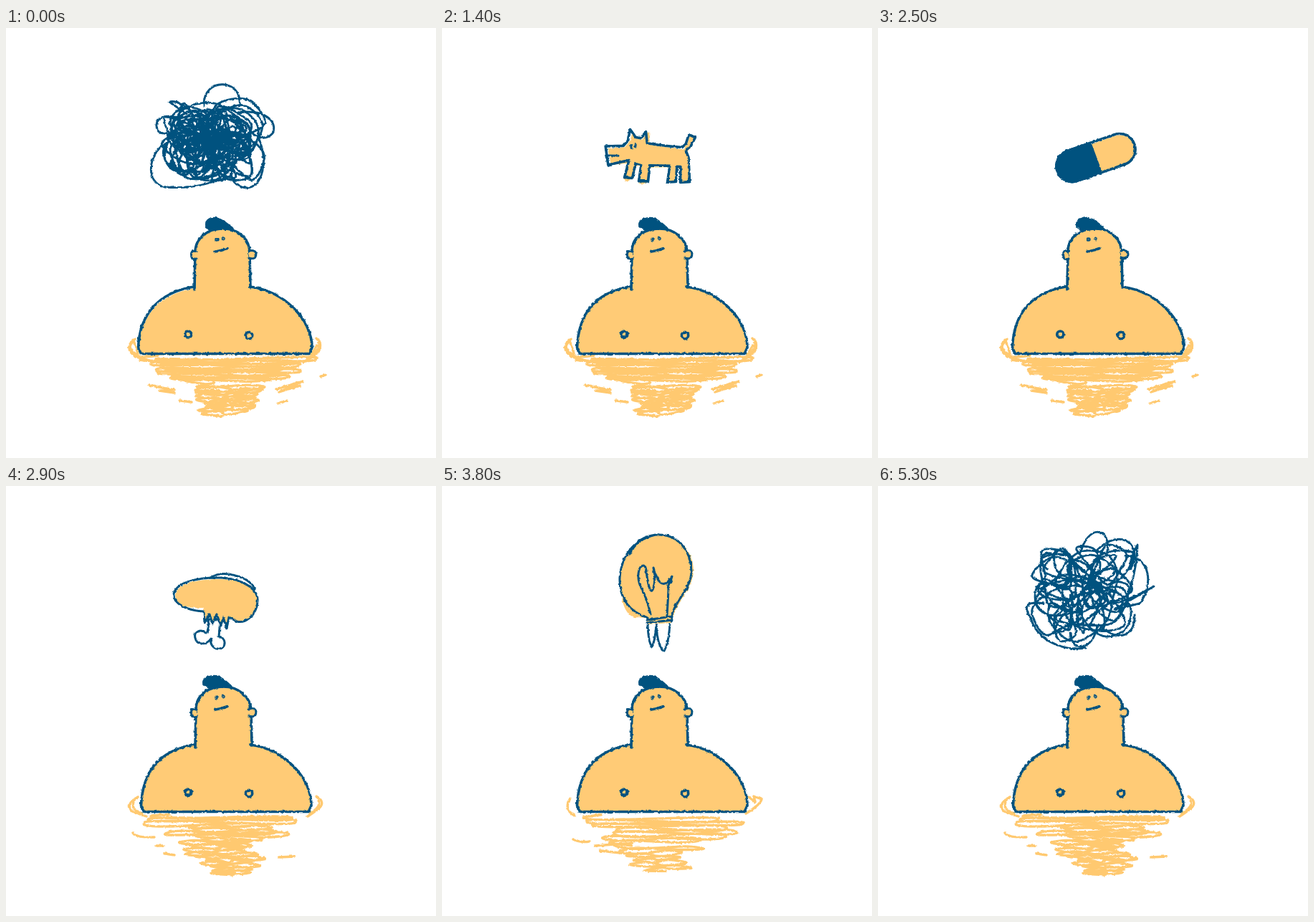
Animation, 600 px wide and 600 px high, one loop 5400 ms. Source, as an HTML page:

```html
<!DOCTYPE html>
<html lang="en">
<head>
<meta charset="utf-8">
<title>Floating thoughts</title>
<style>
  html, body { margin: 0; width: 100%; height: 100%; overflow: hidden; background: #fff; }
  svg { display: block; width: 600px; height: 600px; }
  path, circle { fill: none; stroke-linecap: round; stroke-linejoin: round; }
  .ink { stroke: #00527f; stroke-width: 3.6; }
  .thin { stroke-width: 3; }
  .knot { stroke: #00527f; stroke-width: 2.9; }
  .tan { fill: #ffcb76; }
  .blue { fill: #00527f; }
  .paper { fill: #fff; }
  .wet { stroke: #ffc970; stroke-width: 3.4; }
  .off { display: none; }
</style>
</head>
<body>
<svg viewBox="0 0 600 600">
  <defs id="defs"></defs>
  <g id="water"></g>
  <g id="bodies"></g>
  <g id="face">
    <g id="open" class="ink"><circle class="blue" cx="294" cy="295" r=".9"/><circle class="blue" cx="303.3" cy="294" r=".7"/></g>
    <path id="shut" class="ink thin" d="M290.500 296L298 294.800M302 294L308 293"/>
    <path class="ink" d="M292 312Q300 311 309 307.500"/>
    <circle class="ink" cx="254.300" cy="427.500" r="4.500"/><circle class="ink" cx="339" cy="429" r="4.700"/>
  </g>
  <g id="things">
    <g id="tangle"></g>

    <g id="dog">
      <path class="tan" d="M231 169L255 167L262 158L265 147L272 155L279 156L286 146L290 146L289 163L336 169L341 163L346 149L352 153L348 165L342 172L345 181L346 213L334 214L334 196L329 195L328 214L317 214L319 194L291 195L288 215L281 218L276 217L279 194L271 193L266 210L259 215L255 212L262 189L236 192Z"/>
      <path class="ink" d="M228 166L253 165L259 158L262 142L270 153L277 154L284 145L286 161Q312 165 335 166L340 161L344 148L353 152L347 164L340 170L344 180L346 214L333 215L333 193L328 193L327 214L315 215L318 192L290 192L288 214L275 214L278 192L270 190L266 210L255 209L261 185L232 192Z"/>
      <path class="ink thin" d="M231 179L247 179M263.500 164L264 168M270 163L269.500 167"/>
    </g>

    <g id="pill">
      <g transform="translate(304 181) rotate(-20)">
        <path class="tan" d="M0 -20H35A20 20 0 0 1 35 22H0Z"/>
        <path class="ink" d="M-35 -22H35A22 22 0 0 1 35 22H-35A22 22 0 0 1 -35 -22Z"/>
        <path class="ink blue" d="M-1 -22H-35A22 22 0 0 0 -35 22H0Z"/>
      </g>
    </g>

    <g id="meat">
      <path class="ink thin paper" d="M282 186Q284 197 280 205C270 198 262 205 264 212C266 222 279 223 286 213C284 222 291 228 298 227C309 225 306 211 297 210L299 186Z"/>
      <path class="ink thin" d="M285 128Q299 119 320 125Q341 130 347 144"/>
      <path class="tan" d="M236 153C237 137 265 130 298 130C333 130 352 145 351 160C350 178 337 188 323 188L311 183L308 200L303 184L300 195L294 180L288 192L284 179L277 190L276 170Q245 171 238 161Z"/>
      <path class="ink thin" d="M276 175C254 174 233 165 234 151C237 135 265 127 300 128C335 130 353 146 351 162C349 182 333 192 322 189L311 183L308 199L303 183L300 195L294 179L288 192L284 179L277 191Z"/>
    </g>

    <g id="bulb">
      <path class="ink thin paper" d="M287 193Q288 219 293 224Q297 217 299 194Q301 226 310 230Q317 217 318 190"/>
      <path class="tan" d="M268 183C252 178 249 153 249 128C251 96 276 69 302 69C332 69 351 91 351 118C351 143 326 162 320 191L287 193L285 184Z"/>
      <path class="ink thin" d="M287 184C260 175 247 155 248 128C250 95 274 68 302 68C330 68 347 90 348 118C348 145 326 157 320 182M262 95Q271 74 298 68M286 187L320 182M286 191L321 187M321 182L320 188"/>
      <path class="ink thin" d="M291 179Q286 157 279 144C272 132 273 119 277 113Q284 107 285 119Q289 149 293 146C297 141 298 126 295 114Q303 144 315 134L321 126L319 134Q314 138 316 145L314 181"/>
    </g>

    <g id="fly">
      <path class="ink thin tan" d="M270 187Q274 172 280 171Q284 174 275 188Q286 179 288 185Q288 192 279 193L273 191"/>
      <path class="ink blue" style="stroke-width:2" d="M265 189L273 187L276 191L272 197L270 192Z"/>
      <path class="ink thin" d="M277 200Q281 211 289 210Q303 210 305 218"/>
    </g>
  </g>
</svg>
<script>
const $ = id => document.getElementById(id);
const range = n => [...Array(n).keys()];
const line = (cls, d) => `<path class="${cls}" d="${d}"/>`;

function random(seed) {
  return () => {
    seed = (seed * 1664525 + 1013904223) >>> 0;
    return seed / 4294967296;
  };
}

// Smooth open curve through points
function smooth(p) {
  const at = i => p[Math.max(0, Math.min(p.length - 1, i))];
  const n = v => v.toFixed(1);
  return p.slice(1).reduce((d, b, i) => {
    const z = at(i - 1), a = p[i], c = at(i + 2);
    return d + `C${n(a[0] + (b[0] - z[0]) / 6)} ${n(a[1] + (b[1] - z[1]) / 6)} ` +
      `${n(b[0] - (c[0] - a[0]) / 6)} ${n(b[1] - (c[1] - a[1]) / 6)} ${n(b[0])} ${n(b[1])}`;
  }, 'M' + p[0]);
}

// Sagging back-and-forth strokes that narrow from one row to another
function hatch(seed, passes, [y0, l0, r0], [y1, l1, r1], slack) {
  const rnd = random(seed);
  const points = range(passes).flatMap(k => {
    const t = k / (passes - 1);
    const l = l0 + (l1 - l0) * t, r = r0 + (r1 - r0) * t, y = y0 + (y1 - y0) * t;
    const inset = rnd() * slack * (r - l);
    const end = k % 2 ? r - inset : l + inset;
    const turn = k % 2 ? -1 : 1;
    return [[end + turn * 25, y - 1 + rnd() * 2], [end, y + 2 + rnd() * 3], [end + turn * 30, y + 5 + rnd() * 3]];
  });
  return smooth(points);
}

// Looping line whose centre wanders
function tangle(seed, n, cx, cy, sx, sy, r0, r1) {
  const rnd = random(seed);
  return smooth(range(n).map(k => {
    const r = r0 + (r1 - r0) * rnd();
    return [cx + sx * Math.sin(k * .31 + seed) + r * Math.cos(k * 1.1),
            cy + sy * Math.cos(k * .23) + r * Math.sin(k * 1.1)];
  }));
}

function body(l, r, neckL, neckR, hair, slip) {
  const side = `C214 369 ${l + 2} 398 ${l} 446`;
  const right = `C390 368 ${r} 408 ${r} 446`;
  const head = `M${neckL} 365L${neckL + 1} 312C265 289 286 280 303 280C325 280 ${neckR - 1} 295 ${neckR - 1} 314L${neckR} 362`;
  const ears = `M266 312Q258 309 258.500 317Q259 325 266 322M339 311Q349 309 349 316Q348 324 339 321`;
  const base = `L${l + 4} 454.500L${r - 4} 454.500L${r} 446`;
  return line('tan', `M262 361${side}${base}C${r} 408 390 368 341 361Z" transform="translate(${slip})`) +
    line('tan', head + 'V370H264Z') +
    line('ink', head) + line('tan', ears) + line('ink thin', ears) +
    line('ink', `M262 361${side}${base}M341 361${right}`) +
    line('ink blue', `M${hair + 2} 277Q${hair} 266 291 265.500Q300 266 ${hair / 2 + 177} 280Q300 276 285 282Z`);
}

const ponds = [
  [hatch(4, 17, [457, 174, 438], [490, 226, 392], .2), hatch(9, 17, [496, 262, 368], [534, 268, 348], .15),
   'M180 434Q163 446 181 459L200 464M176 439Q166 448 190 460M178 436L184 454M433 433Q445 442 431 457L415 466M436 438Q442 447 420 462M434 443L426 456',
   'M200 498L218 502L235 505L214 506L235 509M377 504L414 493L381 508L410 499M379 524L392 520M440 486L446 484M243 520L259 522'],
  [hatch(15, 35, [458, 182, 434], [537, 268, 342], .34),
   'M184 434Q164 445 178 455L196 461M178 441Q174 452 190 457M433 433Q448 442 434 452L421 461M436 440Q440 447 424 457',
   'M177 484Q181 491 207 490M210 502L220 502M222 513L235 515M381 518L402 517'],
  [hatch(23, 13, [459, 182, 432], [494, 228, 404], .25), hatch(31, 11, [499, 232, 368], [532, 262, 350], .25),
   'M179 436Q169 451 185 460M428 434L437 441L435 433L446 437Q444 445 424 457',
   'M183 493Q193 498 206 496M213 502L240 500M221 509L258 513']
];

const knots = [
  [tangle(3, 290, 288, 158, 36, 23, 12, 40),
   'M276 108C275 68 330 70 326 108M325 118C360 113 380 130 372 147C360 160 340 150 338 136M352 152C366 185 359 224 334 223C315 220 310 204 318 190M224 160C196 176 195 218 222 222Q260 225 290 214M252 120L228 103Q240 100 258 116M240 125C212 118 204 134 214 146L238 150'],
  [tangle(8, 220, 294, 140, 36, 40, 15, 40), 'M270 90C265 28 330 28 327 85M225 160C200 190 225 225 262 215'],
  [tangle(12, 165, 286, 147, 38, 38, 14, 40),
   'M236 116C222 104 228 92 242 94M282 95C292 53 325 56 320 91M305 90C340 55 372 85 352 116Q350 105 362 82Q362 110 350 150M345 98C382 98 384 140 365 164L330 172L385 140Q350 160 325 165M232 164C205 160 203 168 213 184C221 212 252 231 290 226M268 205C270 233 300 231 306 195M312 197C338 220 360 206 358 180']
];

const group = inner => `<g>${inner}</g>`;
const drawing = cls => shapes => group(shapes.map(d => line(cls, d)).join(''));
$('defs').innerHTML = range(3).map(i =>
  `<filter id="rough${i}" filterUnits="userSpaceOnUse" x="0" y="0" width="600" height="600" color-interpolation-filters="sRGB">
    <feTurbulence type="fractalNoise" baseFrequency=".22" numOctaves="2" seed="${i * 7 + 2}"/>
    <feColorMatrix values="1 0 0 0 0  0 1 0 0 0  0 0 1 0 0  0 0 0 0 1" result="grain"/>
    <feDisplacementMap in="SourceGraphic" in2="grain" scale="3.2" xChannelSelector="R" yChannelSelector="G"/>
  </filter>`).join('');
$('water').innerHTML = ponds.map(drawing('wet')).join('');
$('tangle').innerHTML = knots.map(drawing('knot')).join('');
$('bodies').innerHTML = [
  body(184.5, 427, 263, 341, 278, '1 2'),
  body(187.5, 427, 264, 341, 276, '0 0'),
  body(188.5, 426, 264, 343, 274, '0 0')
].map(group).join('');

// Start step, picture, and the pose in which it sits level
const scenes = [[0, 'tangle'], [7, 'dog', 1], [18, 'pill', 0], [26, 'meat', 2], [34, 'bulb', 2], [39, 'fly', 0], [50, 'tangle']];
const toggle = (el, on) => el.classList.toggle('off', !on);
const pick = (id, n) => [...$(id).children].forEach((el, i) => toggle(el, i === n));

function show(step) {
  const pose = step % 3;
  const [start, name, level = pose] = scenes.filter(s => s[0] <= step).pop();
  const pond = Math.floor((step - start) / 2) % 3;
  pick('bodies', pose);
  pick('tangle', pose);
  pick('water', pond);
  for (const el of $('things').children) toggle(el, el.id === name);
  for (const id of ['bodies', 'face', 'things']) $(id).setAttribute('filter', `url(#rough${pose})`);
  $('water').setAttribute('filter', `url(#rough${pond})`);

  const blink = step === 45 || step === 46;
  toggle($('open'), !blink);
  toggle($('shut'), blink);

  let move = `rotate(${(pose - level) * .8} 300 180)`;
  if (name === 'fly') {
    const a = (step - 45) * .8;
    move += ` translate(${-25 * Math.sin(a)} ${-25 * (1 - Math.cos(a))})`;
  }
  $(name).setAttribute('transform', move);
}

const began = performance.now();
let last = -1;
function tick() {
  const step = Math.floor((performance.now() - began) % 5400 / 100);
  if (step !== last) show(last = step);
  requestAnimationFrame(tick);
}
tick();
</script>
</body>
</html>
```
